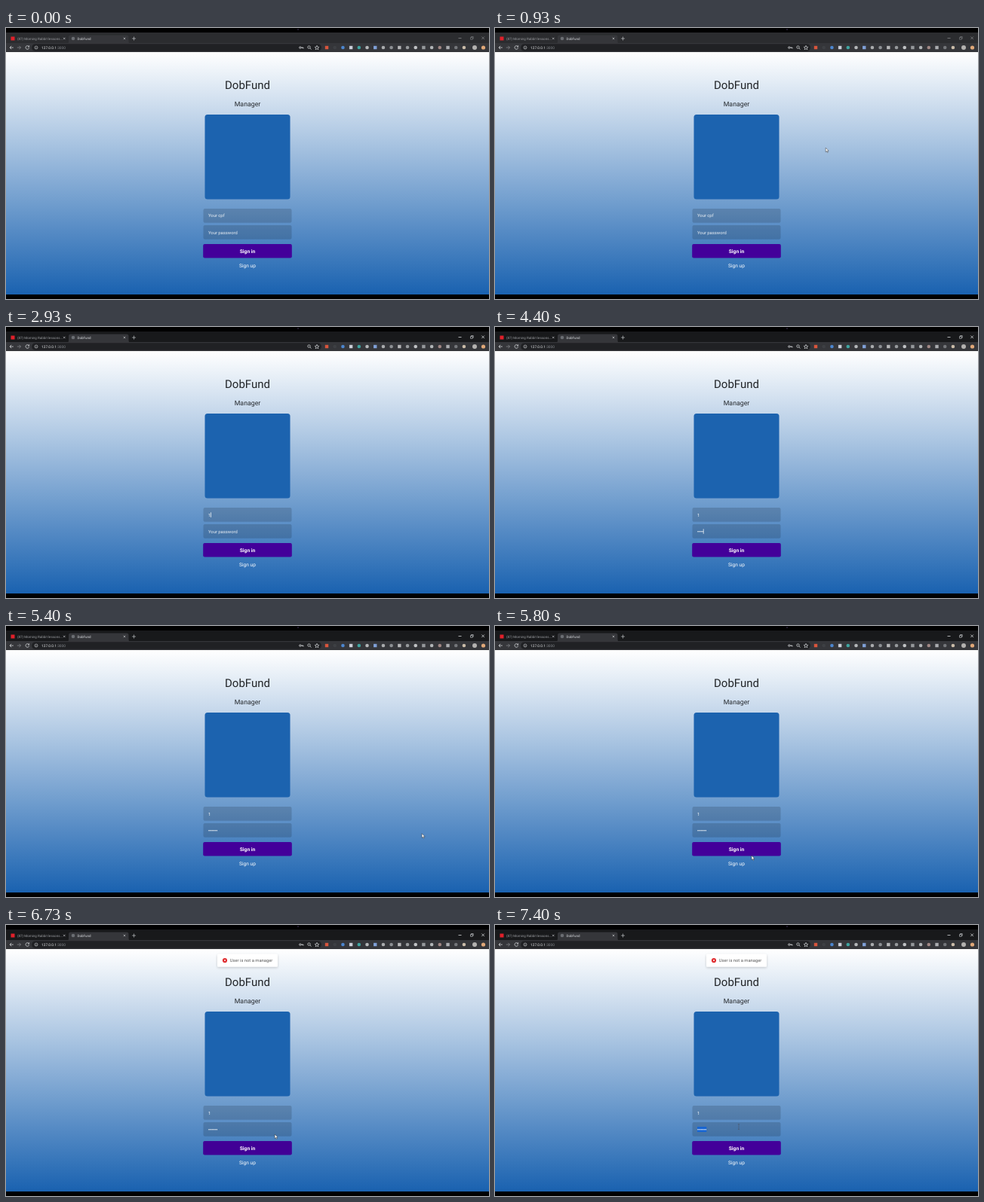
Write an HTML page that moves like this. It is 640 px wide and 360 px high and loops after 8000 ms.

```html
<!DOCTYPE html>
<html lang="en">
<head>
<meta charset="utf-8">
<title>DobFund</title>
<style>
  html, body { margin: 0; width: 100%; height: 100%; overflow: hidden; background: #000; }
  svg { display: block; width: 100vw; height: 100vh; }
  text { font-family: Roboto, Arial, sans-serif; text-rendering: geometricPrecision; }
  .mid { text-anchor: middle; }
  .field { fill: #000; fill-opacity: .15; }
  .hint { font-size: 5.85px; fill: #fff; fill-opacity: .88; }
  .typed { font-size: 5.85px; fill: #fff; }
  .line { fill: none; stroke: #d5d7da; stroke-width: .8; }
</style>
</head>
<body>
<svg viewBox="0 0 640 360" preserveAspectRatio="none">
  <defs>
    <linearGradient id="sky" x1="0" y1="0" x2="0" y2="1">
      <stop offset="0" stop-color="#fff"/>
      <stop offset="1" stop-color="#1a62b0"/>
    </linearGradient>
    <filter id="soft" x="-20%" y="-60%" width="140%" height="240%">
      <feDropShadow dx="0" dy="1.2" stdDeviation="1.8" flood-color="#000" flood-opacity=".2"/>
    </filter>
  </defs>

  <rect width="640" height="360" fill="#000"/>
  <circle cx="387" cy="2" r=".7" fill="#59437a"/>

  <!-- browser -->
  <rect id="strip" y="6" width="640" height="15"/>
  <path d="M81 20.500Q83 20.500 83 18V12Q83 9.500 85.500 9.500H160Q162.500 9.500 162.500 12V18Q162.500 20.500 164.500 20.500Z" fill="#35363a"/>
  <rect y="20" width="640" height="12" fill="#35363a"/>
  <rect x="34" y="21.300" width="384" height="9.400" rx="4.700" fill="#202124"/>
  <rect x="6.500" y="11.500" width="5" height="5" fill="#e0202a"/>
  <text x="15" y="15.800" font-size="4.500" fill="#9b9da1">(87) Morning Rabbit lessons...</text>
  <circle cx="89" cy="14" r="2.300" fill="#6a6d72"/>
  <text x="94.500" y="15.800" font-size="4.500" fill="#dfe1e5">DobFund</text>
  <g class="line">
    <path d="M76 12.700l2.500 2.500m0-2.500l-2.500 2.500M155.700 12.700l2.500 2.500m0-2.500l-2.500 2.500M167 14h5m-2.500-2.500v5" stroke-width=".6"/>
    <path d="M9.800 26H5m2.200-2.200L5 26l2.200 2.200"/>
    <path d="M14.800 26h4.800m-2.200-2.200l2.200 2.200l-2.200 2.200" stroke="#85878b"/>
    <path d="M30.300 24.700a2.300 2.300 0 1 0 .3 1.700M30.600 23.300v1.700h-1.700"/>
    <circle cx="40" cy="26" r="2" stroke-width=".6"/>
    <path d="M40 25.700v1.300" stroke-width=".6"/>
    <circle cx="401.500" cy="25.500" r="1.700"/><path d="M402.800 26.800l1.700 1.700"/>
    <path d="M412 23.300l.8 1.900 2 .2-1.500 1.300.5 2-1.800-1.100-1.800 1.100.5-2-1.500-1.300 2-.2z" stroke-width=".7"/>
  </g>
  <g id="key" class="line"><circle cx="389.800" cy="26" r="1.200"/><path d="M391 26h3v1.400m-1.300-1.400v1"/></g>
  <text x="47" y="28" font-size="4.800" fill="#e8eaed">127.0.0.1<tspan fill="#85888d">:3000</tspan></text>
  <g id="icons"></g>
  <g id="controls" class="line">
    <path d="M599.500 13.500h4M630.300 11.500l3.600 3.600m0-3.600l-3.600 3.600"/>
    <path d="M615.500 12.500h2.700v2.700h-2.700zM616.500 12.500v-1h2.700v2.700h-1" stroke-width=".6"/>
  </g>

  <!-- page -->
  <rect y="32" width="640" height="322" fill="url(#sky)"/>
  <text class="mid" x="320" y="81" font-size="15" fill="#222528">DobFund</text>
  <text class="mid" x="320" y="104.300" font-size="8.750" fill="#25292e">Manager</text>
  <rect x="263.500" y="115" width="113" height="112.500" rx="3.500" fill="#1c63af"/>
  <rect class="field" x="261.500" y="240" width="117" height="18.700" rx="2"/>
  <rect class="field" x="261.500" y="262" width="117" height="18.700" rx="2"/>
  <text id="cpfHint" class="hint" x="268" y="251.400">Your cpf</text>
  <text id="cpf" class="typed" x="268" y="251.500">1</text>
  <text id="passHint" class="hint" x="268" y="273.600">Your password</text>
  <rect id="mark" x="268" y="268" width="12.300" height="7" fill="#1765d2"/>
  <g id="dots" fill="#fff"></g>
  <rect id="caret" width=".7" height="6.500" fill="#fff"/>
  <rect id="button" x="261.200" y="287" width="117.600" height="18.500" rx="2"/>
  <text class="mid" x="320" y="298.900" font-size="6.700" font-weight="700" fill="#fff">Sign in</text>
  <text class="mid" x="320" y="318.100" font-size="6.600" fill="#fff">Sign up</text>

  <g id="toast">
    <rect x="280" y="38.500" width="80" height="17" rx="1.500" fill="#fff" filter="url(#soft)"/>
    <circle cx="290" cy="47" r="3.100" fill="#df2b2f"/>
    <path d="M288.900 45.900l2.200 2.200m0-2.200l-2.200 2.200" stroke="#fff" stroke-width=".7"/>
    <text x="296.800" y="49" font-size="5.800" fill="#5c5c5c">User is not a manager</text>
  </g>

  <path id="arrow" d="M0 0V5.600L1.300 4.400L2.200 6.400L3.100 6L2.200 4H4Z" fill="#fff" stroke="#222" stroke-width=".45"/>
  <path id="beam" d="M-1.100-3.500H1.100M0-3.500V3.500M-1.100 3.500H1.100" fill="none" stroke="#4c5a6c" stroke-width=".6"/>
</svg>
<script>
  const LOOP = 8000;
  const $ = id => document.getElementById(id);
  const show = (id, on) => { $(id).style.display = on ? "" : "none"; };
  const clamp = v => Math.max(0, Math.min(1, v));
  const ease = v => { v = clamp(v); return v * v * (3 - 2 * v); };
  const within = (t, a, b) => t >= a && t < b;

  // [time, x, y]
  const visit = [[130, 500, 2], [330, 582, 120], [530, 520, 290], [670, 466, 307],
                 [870, 440, 180], [1000, 436, 134], [1100, 440, 80], [1270, 450, 0]];
  const click = [[5270, 633, 225], [5470, 520, 295], [5650, 380, 318], [5800, 340, 305],
                 [6000, 340, 299], [6200, 342, 297], [6400, 381, 290], [6600, 381, 289],
                 [6870, 329, 266], [7000, 328, 265], [7130, 323, 268]];
  const strokes = [3670, 3870, 4000, 4400, 4600, 4730];

  function along(path, t) {
    let i = 0;
    while (i < path.length - 2 && t >= path[i + 1][0]) i++;
    const [a, ax, ay] = path[i], [b, bx, by] = path[i + 1];
    const k = ease((t - a) / (b - a));
    return [ax + (bx - ax) * k, ay + (by - ay) * k];
  }

  const tones = "#d9553c #3e4044 #4c86cf #c9ccd6 #3fa5a1 #b4b7b9 #7f9fd6 #a9abad #8d9094 " +
                "#b4b5b7 #96999c #c0c2c4 #96999c #b0b4b6 #a08784 #aaacaf #74767a #c9bba8";
  $("icons").innerHTML = tones.split(" ").map((c, i) => {
    const x = 425 + i * 10.7;
    return i % 3 ? `<circle cx="${x}" cy="26" r="2.300" fill="${c}"/>`
                 : `<rect x="${x - 2.2}" y="23.800" width="4.400" height="4.400" fill="${c}"/>`;
  }).join("") + '<circle cx="621" cy="26" r="3" fill="#b3b1af"/><circle cx="632.500" cy="26" r="2.600" fill="#e0a878"/>';

  $("dots").innerHTML = strokes.map((_, i) =>
    `<circle cx="${269 + i * 2.05}" cy="271.700" r=".75"/>`).join("");

  function draw(t) {
    const active = t >= 1000;
    $("strip").setAttribute("fill", active ? "#18191b" : "#2b2c2f");
    $("controls").setAttribute("opacity", active ? 1 : .5);
    show("key", !within(t, 2930, 3670));

    show("cpfHint", t < 2930);
    show("cpf", t >= 2930);
    const count = strokes.filter(s => t >= s).length;
    show("passHint", !count);
    [...$("dots").children].forEach((d, i) => { d.style.display = i < count ? "" : "none"; });

    show("caret", within(t, 2930, 3270) || within(t, 3670, 5270));
    $("caret").setAttribute("x", count ? 267.6 + count * 2.05 : 271.2);
    $("caret").setAttribute("y", count ? 268.3 : 246.3);
    show("mark", t >= 7270);

    const press = ease((t - 6130) / 200) * (1 - ease((t - 6450) / 400));
    $("button").setAttribute("fill", `rgb(${67 - 11 * press},0,${154 - 20 * press})`);

    const k = clamp((t - 6300) / 200);
    const drop = 1 - (1 - k) * (1 - k);
    $("toast").setAttribute("opacity", drop);
    $("toast").setAttribute("transform", `translate(0 ${-16 * (1 - drop)})`);

    const first = within(t, 130, 1270), later = t >= 5270, text = t >= 6870;
    show("arrow", first || later && !text);
    show("beam", text);
    const [x, y] = along(first ? visit : click, t);
    $(text ? "beam" : "arrow").setAttribute("transform", `translate(${x} ${y})`);
  }

  const start = performance.now();
  function tick() {
    draw((performance.now() - start) % LOOP);
    requestAnimationFrame(tick);
  }
  tick();
</script>
</body>
</html>
```
